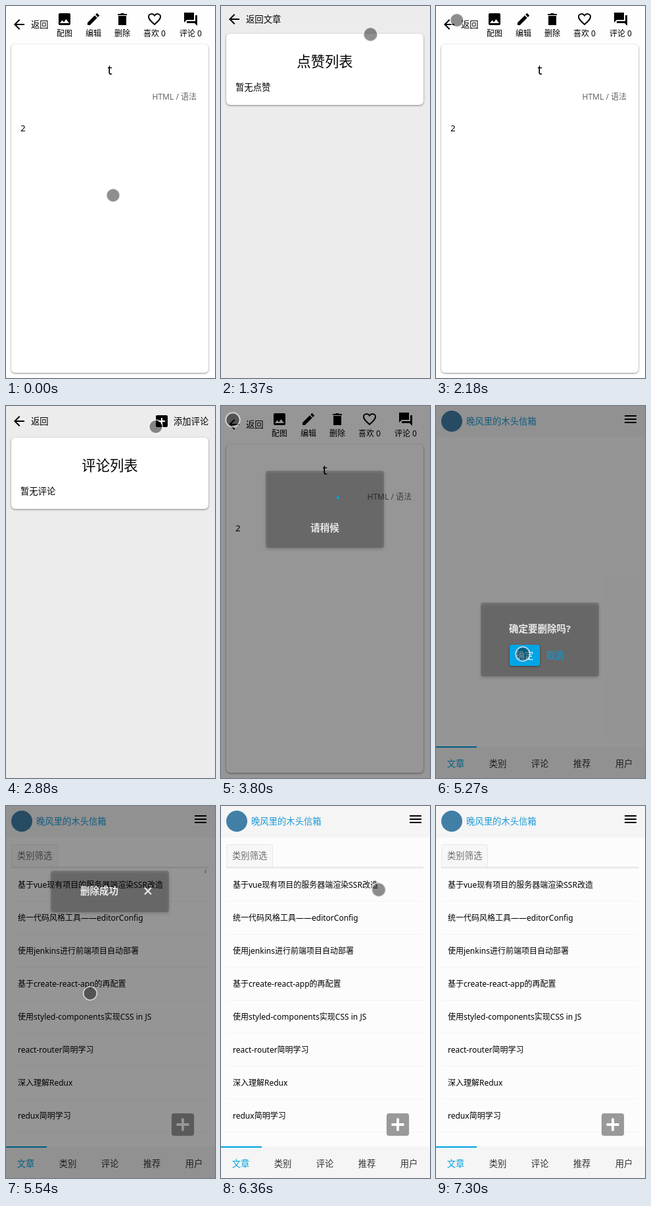
An HTML page that plays this animation: 318 by 564 pixels, repeating every 7.45 s.

```html
<!DOCTYPE html>
<html lang="zh">
<head>
<meta charset="utf-8">
<style>
html, body { margin: 0; width: 100%; height: 100%; overflow: hidden; background: #fff; }
svg { display: block; width: 318px; height: 564px; font-family: "Noto Sans", "Noto Sans CJK SC", "Noto Sans CJK", sans-serif; }
.card { filter: drop-shadow(0 1px 1.5px rgba(0, 0, 0, .45)); }
.panel { filter: drop-shadow(0 2px 2px #000); }
</style>
</head>
<body>
<svg id="stage" viewBox="0 0 318 564" xmlns="http://www.w3.org/2000/svg"></svg>
<script>
const LOOP = 7450;
const FRAME = 137;
const BLUE = '#00a0e0';
const BODY = 13.33;
const MID = 'text-anchor="middle"';
const LIGHT = MID + ' font-weight="bold" fill="#e8e8e8"';

// Every y below is a vertical centre for icons and text.
const text = (str, x, y, size = BODY, attrs = '') =>
  `<text x="${x}" y="${y + size * .37}" font-size="${size}" ${attrs}>${str}</text>`;
const rect = (x, y, w, h, fill, attrs = '') =>
  `<rect x="${x}" y="${y}" width="${w}" height="${h}" fill="${fill}" ${attrs}/>`;
const group = (id, content) => `<g id="${id}">${content}</g>`;
const solid = (d, fill = 'currentColor') => `<path d="${d}" fill="${fill}"/>`;
const line = (d, color = 'currentColor') => `<path d="${d}" fill="none" stroke="${color}" stroke-width="2"/>`;
const tile = rect(3, 3, 18, 18, 'currentColor', 'rx="2"');

const icons = {
  back: line('M20 12H5M12.7 4.7L5.4 12l7.3 7.3'),
  image: tile + solid('M5 18l3.5-4.5 2.5 3 3.5-4.5L19 18z', '#fff'),
  edit: solid('M3 17.2V21h3.8l11-11L14 6.2zM15.1 5.1l2.5-2.3 3.6 3.6-2.3 2.5z'),
  trash: solid('M6 7h12v14H6zM5 4h4l1-1h4l1 1h4v2H5z'),
  heart: line('M12 20C6 14.6 3 12 3 8.5 3 3.5 9.5 2.5 12 6.6 14.5 2.5 21 3.5 21 8.5 21 12 18 14.6 12 20z'),
  forum: solid('M2 2h15v11H6l-4 4zM19 6h3v16l-4-4H6v-3h13z'),
  menu: line('M3 7h18M3 12h18M3 17h18'),
  add: tile + line('M7 12h10M12 7v10', '#fff')
};
const icon = (name, x, y, color = '#000', scale = 1) =>
  `<g color="${color}" transform="translate(${x} ${y}) scale(${scale}) translate(-12 -12)">${icons[name]}</g>`;

const card = (y, h) => rect(8, y, 300, h, '#fff', 'rx="6" class="card"');
const backLink = (label, y) => icon('back', 20, y) + text(label, 38, y + .5);
const tool = (name, label, x) => icon(name, x, 20) + text(label, x, 41.5, 12, MID);

const article = rect(0, 0, 318, 564, '#fefefe') + card(58, 498) + backLink('返回', 28) +
  tool('image', '配图', 89) + tool('edit', '编辑', 133) + tool('trash', '删除', 177) +
  tool('heart', '喜欢 0', 226) + tool('forum', '评论 0', 281) +
  text('t', 158, 97, 20, MID) +
  text('HTML / 语法', 290, 137.5, 12, 'text-anchor="end" fill="#666"') +
  text('2', 22, 185);

const emptyList = (back, title, note, headY, cardY) =>
  rect(0, 0, 318, 564, '#ececec') + card(cardY, 108) + backLink(back, headY) +
  text(title, 158, cardY + 42, 21.33, MID + ' font-weight="300"') + text(note, 22, cardY + 81.5);
const likes = emptyList('返回文章', '点赞列表', '暂无点赞', 20, 42);
const comments = emptyList('返回', '评论列表', '暂无评论', 23, 48) +
  icon('add', 237, 23) + text('添加评论', 255, 23.5);

const posts = ['基于vue现有项目的服务器端渲染SSR改造', '统一代码风格工具——editorConfig',
  '使用jenkins进行前端项目自动部署', '基于create-react-app的再配置',
  '使用styled-components实现CSS in JS', 'react-router简明学习', '深入理解Redux', 'redux简明学习'];
const tabs = ['文章', '类别', '评论', '推荐', '用户'];
const home = rect(0, 0, 318, 564, '#fcfcfc') + rect(0, 0, 318, 48, '#f5f5f5') +
  '<circle cx="24" cy="23" r="16" fill="#417fa6"/>' +
  text('晚风里的木头信箱', 46, 23, BODY, 'fill="#1c99d6"') + icon('menu', 296, 20) +
  group('posts',
    rect(8.5, 58.5, 70, 34, '#f7f7f7', 'rx="2" stroke="#e9e9e9"') +
    text('类别筛选', 17, 75.5, BODY, 'fill="#6c6c6c"') + rect(8, 92, 300, 2.5, '#e8e8e8') +
    posts.map((post, i) => text(post, 18, 119.5 + i * 50, 12) + rect(8, 144 + i * 50, 300, 1, '#f4f4f4')).join('') +
    icon('add', 269, 483, '#999', 1.9)) +
  rect(0, 516, 318, 48, '#f5f5f5') + rect(0, 516, 62, 2, BLUE) +
  tabs.map((tab, i) => text(tab, 30 + i * 64, 542, BODY, `${MID} fill="${i ? '#333' : BLUE}"`)).join('');

// The panel's own shadow shows through its translucent fill.
const panel = (y, h) => rect(68, y, 180, h, 'rgba(0,0,0,.17)', 'rx="4" class="panel"');
const waiting = panel(98, 117) + group('dots', '') + text('请稍候', 158, 184.5, 14.5, LIGHT);
const confirmBox = panel(298, 112) + text('确定要删除吗?', 158, 338, 14.5, LIGHT) +
  rect(112, 362, 46, 32, '#00a5e6', 'rx="3" class="card"') +
  text('确定', 135, 378, BODY, MID + ' fill="#fff"') + text('取消', 168, 378, BODY, `fill="${BLUE}"`);
const success = panel(98, 63) + text('删除成功', 142, 129, 14.5, LIGHT) +
  line('M211 124l10 10m0-10l-10 10', '#eee') + rect(302, 97, 3, 5, '#777');

document.getElementById('stage').innerHTML =
  group('article', article) + group('likes', likes) + group('comments', comments) + group('home', home) +
  group('shade', rect(0, 0, 318, 564, 'rgba(0,0,0,.41)')) +
  group('waiting', waiting) + group('confirm', confirmBox) + group('success', success) +
  '<circle id="cursor" fill="rgba(0,0,0,.44)" stroke="#fff" stroke-opacity=".65"/>';
const el = id => document.getElementById(id);
const show = (id, opacity) => {
  el(id).style.display = opacity ? '' : 'none';
  el(id).style.opacity = Number(opacity);
};

// The pointer rests around each tap; a tap may open a page or press a button.
const REST_BEFORE = 250, REST_AFTER = 130;
const stop = (at, x, y, press = false, page) =>
  ({ x, y, press, page, at, from: at - REST_BEFORE, until: at + REST_AFTER });
const pass = (at, x, y) => ({ x, y, from: at, until: at });
const route = [
  stop(270, 163, 287),
  stop(1370, 227.5, 43, true, 'likes'),
  stop(1910, 20, 21, true, 'article'),
  stop(2620, 280, 34, true, 'comments'),
  stop(3640, 18, 21, true, 'article'),
  stop(4600, 177, 34, true),
  stop(5270, 132, 376, true, 'home'),
  pass(5480, 128, 284),
  stop(6230, 240, 127, true),
  stop(6630, 240, 127),
  stop(7300, 278, 551)
];

function cursorAt(t) {
  const i = route.findIndex(s => t <= s.until);
  const goal = route[i] || route[route.length - 1];
  if (i < 1 || t >= goal.from) return goal;
  const last = route[i - 1];
  const k = (t - last.until) / (goal.from - last.until);
  return { x: last.x + (goal.x - last.x) * k, y: last.y + (goal.y - last.y) * k };
}

function draw(t) {
  const within = (from, to) => t >= from && t < to;
  const opened = route.filter(s => s.page && s.at <= t).pop();
  const page = opened ? opened.page : 'article';
  for (const id of ['article', 'likes', 'comments', 'home']) show(id, id === page);
  show('posts', t >= 5500);

  const wait = within(3750, 4050) || within(5400, 5500);
  const ask = within(4600, 5400);
  const notice = within(5500, 6360) && (t < 6230 ? 1 : .5);
  show('waiting', wait);
  show('confirm', ask);
  show('success', notice);
  show('shade', wait || ask ? 1 : notice);

  const dotCount = t < 3900 ? 1 : 3;
  el('dots').innerHTML = Array.from({ length: dotCount }, (_, i) =>
    `<circle cx="${158 + 20 * Math.cos(i * .55)}" cy="${139 + 20 * Math.sin(i * .55)}" r="2.2" fill="${BLUE}"/>`).join('');

  const { x, y, press } = cursorAt(Math.floor(t / FRAME) * FRAME);
  const attrs = { cx: x, cy: y, r: press ? 10.7 : 10.2, 'stroke-width': press ? 2 : 1.7 };
  for (const name in attrs) el('cursor').setAttribute(name, attrs[name]);
  show('cursor', t < 7300);
}

const begin = performance.now();
function tick() {
  draw((performance.now() - begin) % LOOP);
  requestAnimationFrame(tick);
}
tick();
</script>
</body>
</html>
```
